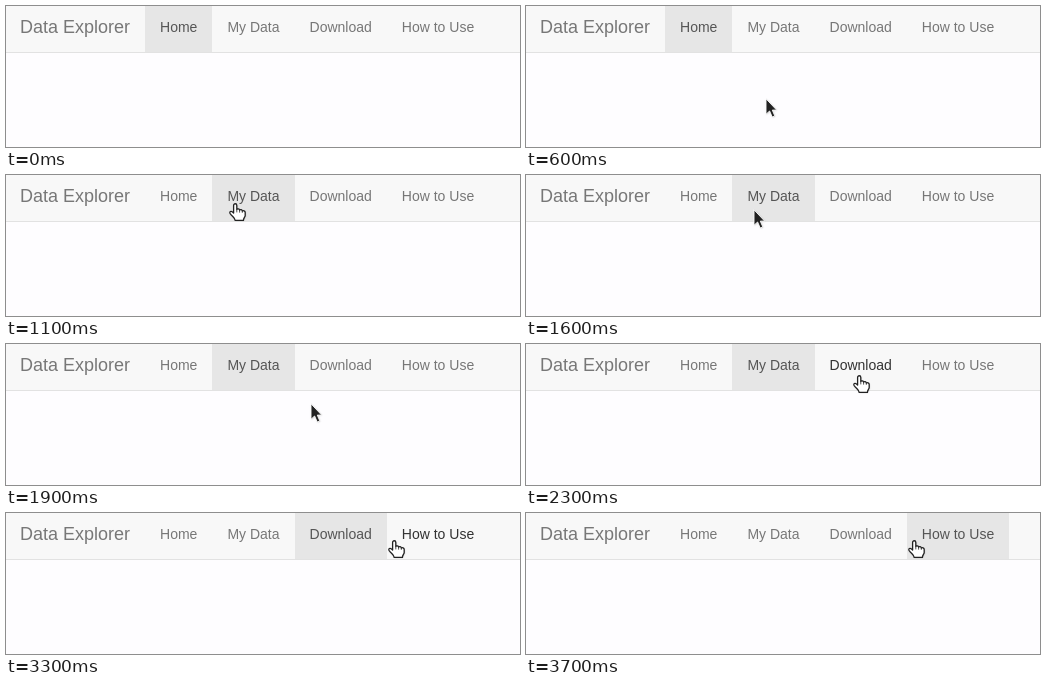
An HTML page with a canvas for the animation above (4900 ms loop, 514x141 px).

```html
<!DOCTYPE html>
<html lang="en">
<head>
<meta charset="utf-8">
<title>Data Explorer</title>
<style>
  html, body { margin: 0; width: 100%; height: 100%; overflow: hidden; background: #fefdff; }
  #stage { position: relative; width: 514px; height: 141px; overflow: hidden; }
  nav {
    position: absolute; left: 0; top: -4px; width: 514px; height: 50px;
    display: flex; background: #f8f8f8; border-bottom: 1px solid #e2e2e2;
    font: 14px/20px "Liberation Sans", Arial, sans-serif; color: #777; white-space: nowrap;
  }
  nav span { padding: 15px; height: 20px; flex: none; }
  nav .brand { font-size: 18px; margin-left: -1px; }
  nav .hover { color: #333; }
  nav .active { color: #555; background: #e6e6e6; }
  canvas { position: absolute; left: 0; top: 0; }
</style>
</head>
<body>
<div id="stage">
  <nav>
    <span class="brand">Data Explorer</span>
    <span class="tab">Home</span>
    <span class="tab">My Data</span>
    <span class="tab">Download</span>
    <span class="tab">How to Use</span>
  </nav>
  <canvas width="514" height="141"></canvas>
</div>
<script>
const LOOP = 4900;
const tabs = [...document.querySelectorAll('.tab')];
const ctx = document.querySelector('canvas').getContext('2d');

// [time, active tab]
const clicks = [[0, 0], [1100, 1], [2800, 2], [3700, 3]];

// [time, left, top, pointer, hovered tab]
const moves = [
  [0],
  [400, 240, 102, 'arrow'],
  [600, 239, 92, 'arrow'],
  [700, 236, 70, 'arrow'],
  [800, 231, 48, 'arrow'],
  [900, 223, 28, 'hand', 1],
  [1600, 227, 34, 'arrow'],
  [1700, 250, 53, 'arrow'],
  [1800, 284, 62, 'arrow'],
  [1900, 304, 59, 'arrow'],
  [2100, 316, 55, 'arrow'],
  [2200, 327, 46, 'arrow'],
  [2300, 327, 31, 'hand', 2],
  [3100, 342, 33, 'hand', 2],
  [3200, 367, 31, 'hand', 2],
  [3300, 382, 27, 'hand', 3]
];

const shapes = {
  arrow: {
    path: new Path2D('M1 .8V16.3L4.6 13L7.2 19L9.8 17.9L7.3 12.1H11.7Z'),
    fill: '#222', line: '#fff', width: 0.9
  },
  hand: {
    path: new Path2D('M4.6 10V2.4C4.6 .2 7.8 .2 7.8 2.4V6.6' +
      'C8.3 5.5 10.5 5.8 10.6 7.2C11.3 6.2 13.2 6.7 13.3 8' +
      'C14.2 7.2 16.2 7.8 16.2 9.4V12.4C16.2 14 14.4 15 14.4 17.4' +
      'H6.2C6.2 15 3.2 13.6 1 10.3C.2 8.7 2 7.7 3.2 8.8Z'),
    fill: '#fff', line: '#222', width: 1.3
  }
};

const latest = (rows, t) => rows.filter(row => row[0] <= t).pop();

function drawPointer(x, y, kind) {
  const shape = shapes[kind];
  ctx.save();
  ctx.translate(x, y);
  ctx.lineJoin = 'round';
  ctx.lineWidth = shape.width;
  ctx.strokeStyle = shape.line;
  ctx.fillStyle = shape.fill;
  ctx.shadowColor = 'rgba(0,0,0,.25)';
  ctx.shadowBlur = 1.5;
  ctx.shadowOffsetX = ctx.shadowOffsetY = 0.5;
  ctx.fill(shape.path);
  ctx.shadowColor = 'transparent';
  ctx.stroke(shape.path);
  if (kind === 'hand') {
    ctx.lineWidth = 0.8;
    ctx.stroke(new Path2D('M7.8 6.6V9.4M10.6 7.2V9.6M13.3 8V9.8'));
  }
  ctx.restore();
}

function render() {
  const t = performance.now() % LOOP;
  const active = latest(clicks, t)[1];
  const [, x, y, kind, hover] = latest(moves, t);
  tabs.forEach((tab, i) => {
    tab.classList.toggle('active', i === active);
    tab.classList.toggle('hover', i === hover);
  });
  ctx.clearRect(0, 0, 514, 141);
  if (kind) drawPointer(x, y, kind);
  requestAnimationFrame(render);
}
render();
</script>
</body>
</html>
```
